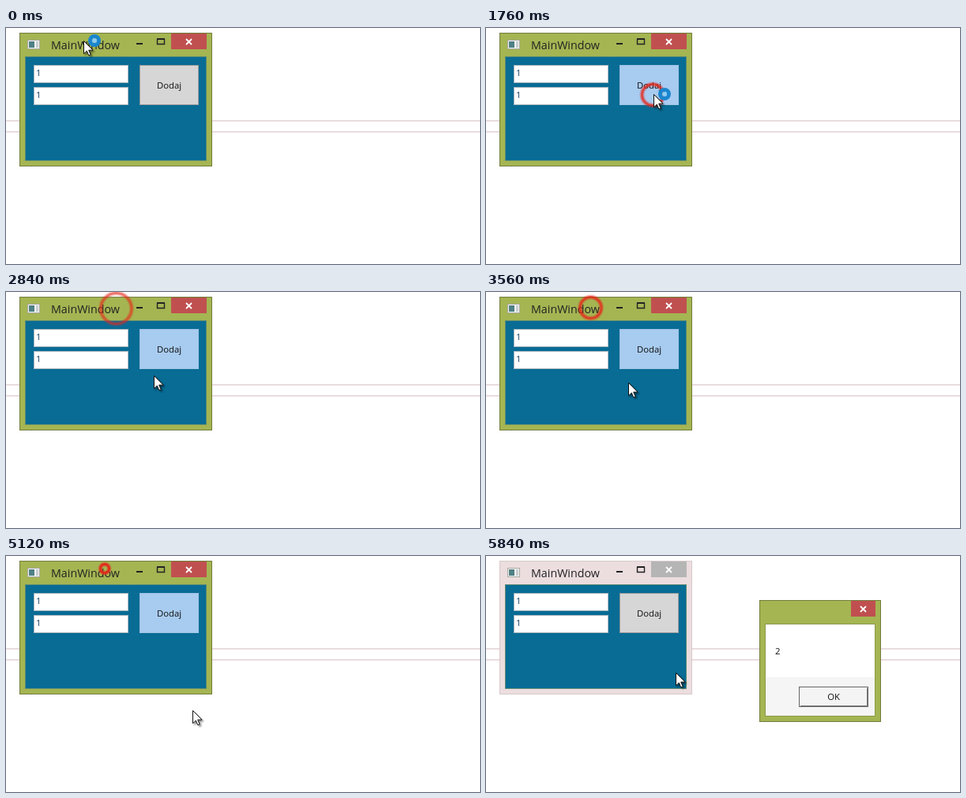
Recreate the animation shown at these times as an HTML page. Size 600 by 300 pixels, loop 5900 ms.

```html
<!DOCTYPE html>
<html lang="pl">
<head>
<meta charset="utf-8">
<title>MainWindow</title>
<style>
  html, body { margin: 0; width: 100%; height: 100%; overflow: hidden; background: #fff; }
  svg { position: absolute; left: 0; top: 0; overflow: visible; }
  text { font: 11.3px "Open Sans", "Noto Sans", sans-serif; fill: #111; }
  .title { font-size: 14.25px; fill: #222; }
  .value { fill: #1d3f5c; }
  .frame { fill: #a4b552; stroke: #727d3c; }
  .close { fill: #c05050; }
  .input { fill: #fff; stroke: #a9b6bd; }
  .button { fill: #d6d6d6; stroke: #9a9a9a; }
  .focused .button { fill: #a8cbf0; stroke: #9fc4e4; }
  .pressed .button { fill: #8db8e6; }
  .inactive .frame { fill: #ecdddf; stroke: #d6c8ca; }
  .inactive .close { fill: #b5b5b5; }
  #dialog { left: 346px; top: 56px; transform-origin: 77px 77.5px; }
  #arrow { filter: drop-shadow(2px 2px 1px rgba(0, 0, 0, .45)); }
</style>
</head>
<body>
<svg width="600" height="300">
  <defs><path id="cross" d="M-3.5-3.5 3.5 3.5M3.5-3.5-3.5 3.5" stroke="#fff" stroke-width="1.8"/></defs>
  <path d="M0 118H600M0 132H600" stroke="#e9dcdf" stroke-width="2"/>
  <g id="main">
    <rect class="frame" x="17.5" y="6.5" width="243" height="169"/>
    <rect x="24.5" y="36.5" width="229" height="132" fill="#086c95" stroke="#5c8a74"/>
    <rect x="27.5" y="15.5" width="15" height="11" fill="#f4f4f4" stroke="#a8a8a0"/>
    <rect x="29" y="17" width="7" height="8" fill="#4f8084"/>
    <rect x="38" y="17" width="3" height="8" fill="#c9cdd0"/>
    <text class="title" x="57" y="27">MainWindow</text>
    <path d="M165 20H173" stroke="#222" stroke-width="2"/>
    <path d="M191.5 14V20.5H200.5V14M191 14H201" fill="none" stroke="#222" stroke-width="1.4"/>
    <path d="M191 14H201" stroke="#222" stroke-width="2"/>
    <rect class="close" x="209" y="7" width="45" height="20"/>
    <use href="#cross" x="231.5" y="17.5"/>
    <rect class="input" x="35.5" y="47.5" width="119" height="22"/>
    <rect class="input" x="35.5" y="75.5" width="119" height="22"/>
    <text class="value" x="38" y="61">1</text>
    <text class="value" x="38" y="89">1</text>
    <rect class="button" x="169.5" y="47.5" width="74" height="50"/>
    <text x="206.5" y="77" text-anchor="middle">Dodaj</text>
  </g>
</svg>

<svg id="dialog" width="154" height="155">
  <rect class="frame" x=".5" y=".5" width="153" height="154"/>
  <rect x="7.5" y="30.5" width="139" height="117" fill="#fff" stroke="#8d9a4a"/>
  <rect x="8" y="98" width="138" height="49" fill="#f5f5f5"/>
  <rect class="close" x="116" y="1" width="31" height="20"/>
  <use href="#cross" x="131.5" y="11.5"/>
  <text x="20" y="69">2</text>
  <rect x="50.5" y="110.5" width="87" height="25" fill="#f4f4f4" stroke="#666"/>
  <path d="M52 134.5H136.5V112" fill="none" stroke="#777"/>
  <text x="94" y="127" text-anchor="middle">OK</text>
</svg>

<svg width="600" height="300">
  <g id="ring" fill="none" stroke="#e6291c">
    <circle stroke-width="6" stroke-opacity=".4"/>
    <circle stroke-width="3"/>
  </g>
  <g id="cursor">
    <g id="arrow"><path d="M.5.5V16.8L4.3 13.2 6.8 18.9 9.2 17.9 6.7 12.2H12Z" fill="#fff" stroke="#111"/></g>
    <g id="busy" fill="none">
      <circle cx="14" r="5.5" stroke="#1b86cf" stroke-width="5"/>
      <circle cx="14" r="3" fill="#8ccbf2"/>
    </g>
  </g>
</svg>

<script>
const LOOP = 5900, RING_LIFE = 660;
const $ = id => document.getElementById(id);

// time, x, y of the pointer tip
const path = [
  [460, 98, 16], [640, 165, 62], [830, 226, 112], [1010, 216, 88], [1190, 212, 84],
  [2120, 212, 84], [2660, 193, 96], [2840, 187, 106], [3260, 185, 108], [3560, 180, 115],
  [3740, 208, 179], [3860, 208, 171], [4460, 222, 171], [4520, 238, 190], [5060, 237, 194],
  [5480, 231, 208], [5660, 240, 148]
];
// start time and centre of each click ring
const clicks = [[1520, 211, 85], [2480, 139.5, 21], [3320, 132.5, 20], [4160, 120.5, 14], [5040, 125, 16]];

function pointerAt(t) {
  const i = path.findIndex(p => p[0] > t);
  if (i === 0) return path[0].slice(1);
  if (i < 0) return path.at(-1).slice(1);
  const [t0, x0, y0] = path[i - 1], [t1, x1, y1] = path[i];
  const k = (t - t0) / (t1 - t0);
  return [x0 + (x1 - x0) * k, y0 + (y1 - y0) * k];
}

function drawRing(t) {
  const click = clicks.find(([start]) => t >= start && t < start + RING_LIFE);
  $('ring').style.display = click ? '' : 'none';
  if (!click) return;
  const [start, x, y] = click, age = t - start;
  $('ring').setAttribute('transform', `translate(${x} ${y})`);
  $('ring').style.opacity = 1 - (age / RING_LIFE) ** 1.7;
  for (const circle of $('ring').children) circle.setAttribute('r', 1.5 + age / 20);
}

function drawDialog(t) {
  const q = Math.min(1, Math.max(0, (t - 5360) / 300)), left = (1 - q) ** 2;
  $('dialog').style.opacity = 1 - left;
  $('dialog').style.transform = left
    ? `translateY(${-4 * left}px) perspective(1000px) rotateX(${-24 * left}deg) scale(${1 - 0.1 * left})`
    : 'none';
}

function draw(now) {
  const time = now % LOOP;
  const t = Math.floor((time - 20) / 60) * 60 + 20;
  const [x, y] = pointerAt(t);
  $('cursor').setAttribute('transform', `translate(${Math.round(x)} ${Math.round(y)})`);
  $('busy').style.display = t < 2420 ? '' : 'none';
  const main = $('main').classList;
  main.toggle('focused', t >= 700 && t < 5360);
  main.toggle('pressed', t >= 1520 && t < 1640);
  main.toggle('inactive', t >= 5360);
  drawRing(t);
  drawDialog(t);
  requestAnimationFrame(() => draw(performance.now() - begin));
}

const begin = performance.now();
draw(0);
</script>
</body>
</html>
```
